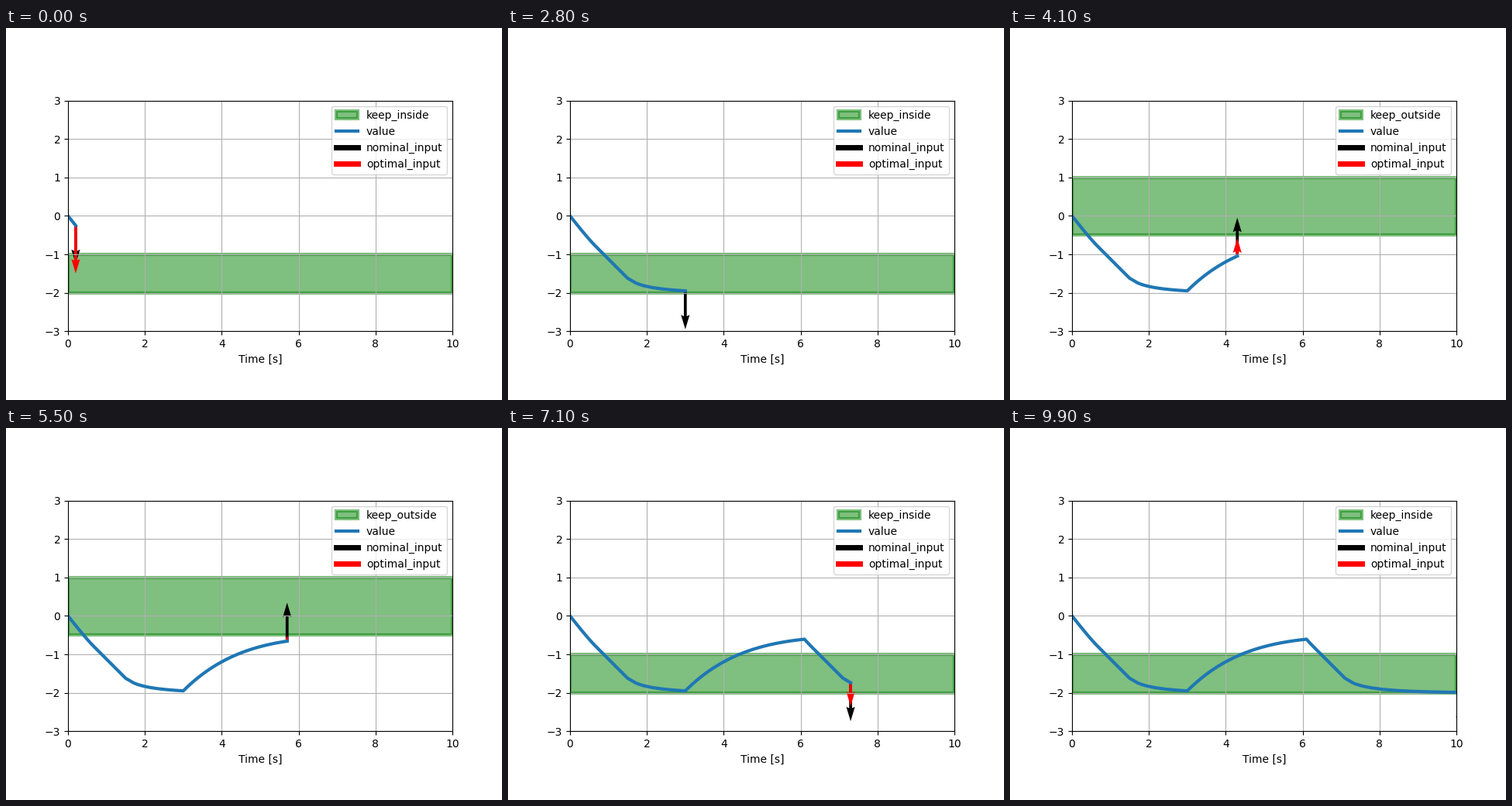
A matplotlib script that plays this animation: 640 px wide and 480 px high, repeating every 10000 ms.

```python
import numpy as np
import matplotlib.pyplot as plt
from matplotlib.animation import FuncAnimation

DT = 0.1
FRAMES = 100
INSIDE = (-2.0, -1.0)
OUTSIDE = (-0.5, 1.0)


def stage(k):
    """Label, band and nominal input that hold during step k."""
    if 30 <= k < 61:
        return "keep_outside", OUTSIDE, 1.0
    return "keep_inside", INSIDE, -1.0


def bound(x, label, band):
    """Upper (outside) or lower/upper (inside) input limit of the barrier."""
    lo, hi = band
    sign = 1 if label == "keep_inside" else -1
    h = sign * (x - lo) * (hi - x)
    dh = sign * (lo + hi - 2 * x)
    push = h if h >= 0 else -2.68 * np.sqrt(-h)
    return -push / dh, dh


def simulate(steps):
    """Euler run of x' = u with the input filtered by the barrier."""
    x, u = np.zeros(steps + 1), np.zeros(steps)
    free = True
    for k in range(steps):
        label, band, nominal = stage(k)
        limit, dh = bound(x[k], label, band)
        u[k] = max(nominal, limit) if dh > 0 else min(nominal, limit)
        bound_now = u[k] != nominal
        if bound_now and free and abs(u[k]) < 1:
            u[k] *= 0.6  # brake harder on first contact
        free = not bound_now
        x[k + 1] = x[k] + u[k] * DT
    return x, u


xs, us = simulate(FRAMES + 1)
ts = np.arange(len(xs)) * DT

fig, ax = plt.subplots(figsize=(6.4, 4.8), dpi=100)
ax.set_xlim(0, 10)
ax.set_ylim(-3, 3)
ax.set_aspect("equal")
ax.set_xlabel("Time [s]")
ax.grid(True)

span = ax.axhspan(*INSIDE, color="green", alpha=0.5, lw=3, label="keep_inside")
line, = ax.plot([], [], lw=3, label="value")


def arrow(color, label):
    ax.plot([], [], color=color, lw=5, label=label)
    return ax.quiver([0], [0], [0], [-1], color=color,
                     angles="xy", scale_units="xy", scale=1)


nominal_arrow = arrow("black", "nominal_input")
optimal_arrow = arrow("red", "optimal_input")
legend = ax.legend(loc="upper right")


def update(i):
    k = i + 1
    label, (lo, hi), nominal = stage(k)
    span.set_y(lo)
    span.set_height(hi - lo)
    legend.get_texts()[0].set_text(label)
    line.set_data(ts[:k + 2], xs[:k + 2])
    for q, v in ((nominal_arrow, nominal), (optimal_arrow, us[k])):
        q.set_offsets([[ts[k + 1], xs[k + 1]]])
        q.set_UVC([0], [v])
    return span, line, nominal_arrow, optimal_arrow, legend


anim = FuncAnimation(fig, update, frames=FRAMES, interval=100, repeat=True)
plt.show()
```
